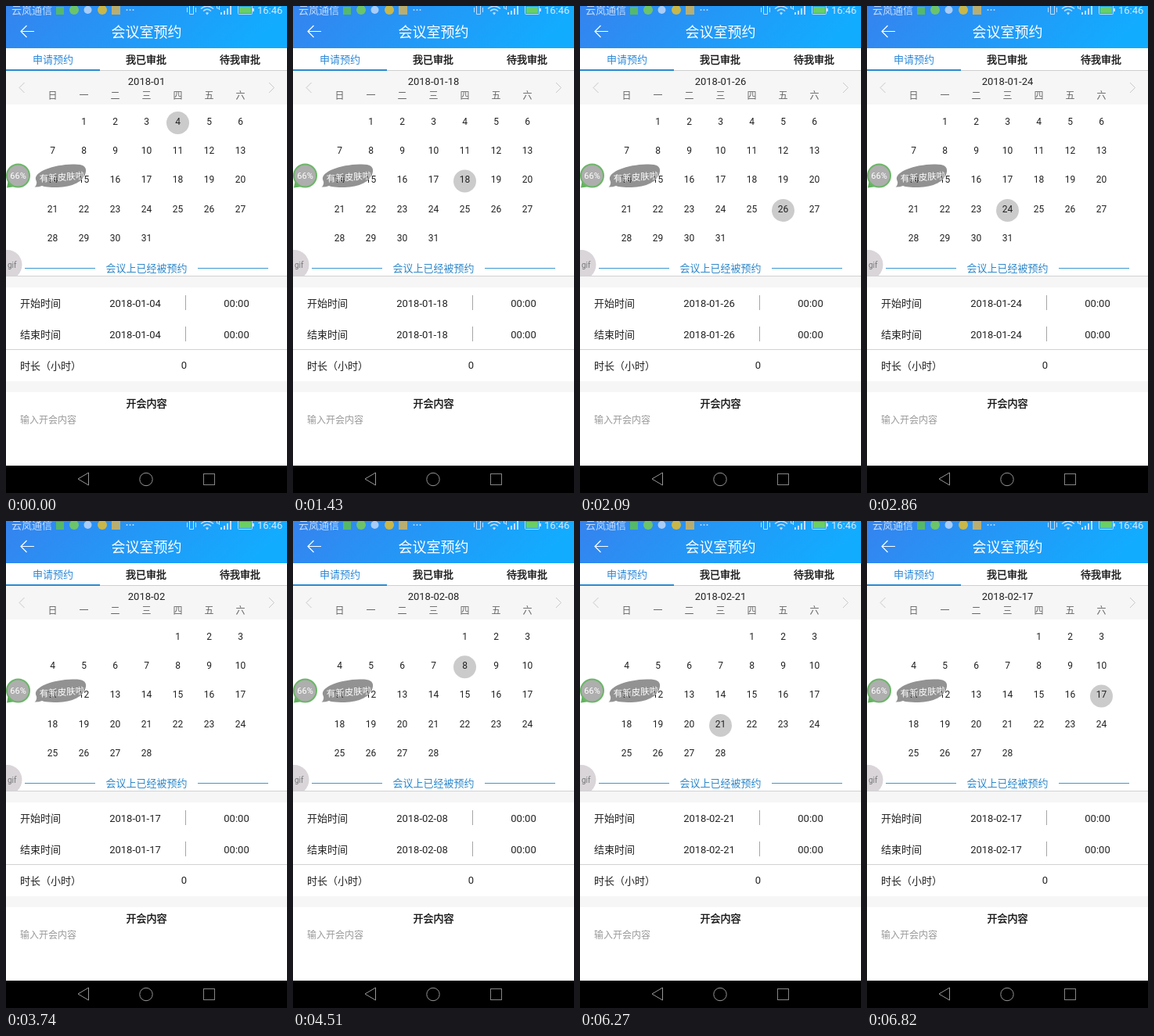
An HTML page that plays this animation: 359x623 px, repeating every 7040 ms.

```html
<!DOCTYPE html>
<html lang="zh">
<head>
<meta charset="utf-8">
<style>
html, body { margin: 0; width: 100%; height: 100%; overflow: hidden; background: #fff; }
svg { display: block; width: 359px; height: 623px; }
text { font: 13px Roboto, "Noto Sans CJK SC", "Noto Sans CJK", sans-serif; fill: #222; }
.mid { text-anchor: middle; }
.small { font-size: 12px; }
.strong { fill: #111; stroke: #111; stroke-width: .35; }
.line { fill: none; stroke-width: 1; }
</style>
</head>
<body>
<svg viewBox="0 0 359 623">
  <defs>
    <linearGradient id="sky" x2="1" y2=".15">
      <stop stop-color="#3583ee"/><stop offset="1" stop-color="#12acff"/>
    </linearGradient>
  </defs>
  <rect width="359" height="623" fill="#fff"/>
  <rect width="359" height="54" fill="url(#sky)"/>

  <!-- status bar -->
  <g>
    <text x="7" y="10" style="fill:#c4dcfb">云岚通信</text>
    <rect x="64" y="1" width="10" height="10" fill="#55b96c"/>
    <circle cx="87" cy="5" r="6" fill="#6cc46a"/>
    <circle cx="104.500" cy="5" r="5" fill="#a9cdf8"/>
    <circle cx="123" cy="5" r="6" fill="#c9b74a"/>
    <rect x="135" y="0" width="11" height="11" fill="#b9ae72"/>
    <g fill="#c4dcfb">
      <circle cx="154.500" cy="5" r="1"/><circle cx="158.500" cy="5" r="1"/><circle cx="162.500" cy="5" r="1"/>
      <path d="M255 9 L257 11.500 L259 9 A3 3 0 0 0 255 9Z"/>
      <path d="M274 11v-3h2v3zM278 11v-5h2v5zM282 11V3h2v8zM286 11V0h2v11z"/>
    </g>
    <g class="line" stroke="#c4dcfb">
      <path d="M234.500 0V10.500H239.500V0M231.500 2V8M242.500 2V8"/>
      <path d="M249 3.500Q257 -3 265 3.500M252 6.500Q257 2 262 6.500" stroke-width="1.500"/>
      <path d="M269.500 0V3H273M272.500 0V5"/>
      <rect x="296.500" y="-.5" width="18" height="11" rx="1"/>
    </g>
    <rect x="298" y="1" width="15" height="8" fill="#69cf66"/>
    <rect x="315" y="3" width="2" height="4" fill="#c4dcfb"/>
    <text x="321" y="10" style="fill:#d8e8fc">16:46</text>
  </g>

  <path d="M36 32.500H19.500M26.500 25L19 32.500L26.500 40" class="line" stroke="#fff" style="stroke-width:1.200"/>
  <text class="mid" x="179.500" y="39.500" style="font-size:18px;fill:#fff">会议室预约</text>

  <!-- tabs -->
  <text class="mid" x="60" y="73" style="fill:#2b88d8">申请预约</text>
  <text class="mid strong" x="179" y="73">我已审批</text>
  <text class="mid strong" x="299" y="73">待我审批</text>
  <rect y="83" width="359" height="43" fill="#f6f6f6"/>
  <rect y="82" width="359" height="1" fill="#cfcfcf"/>
  <rect y="81" width="120" height="2" fill="#2b8bd0"/>

  <!-- calendar -->
  <path d="M23.500 98L17 104.500L23.500 111M336 98L342.500 104.500L336 111" class="line" stroke="#c8c8c8"/>
  <text class="mid" id="title" x="179.500" y="101"></text>
  <g id="week"></g>
  <circle id="pick" r="14.500" fill="#cbcbcb"/>

  <!-- floating bubbles, the days show through -->
  <path d="M36.500 231.500Q41 228 38 222C36 212 60 203 85 202.500C98 202 103 205 102 212C100 225 84 231.500 66 232Q50 232 46 230Q41 232 36.500 231.500Z" fill="#929292"/>
  <g id="days"></g>
  <text x="43" y="225" transform="rotate(-4 43 225)" style="font-size:11.500px;fill:#fff">有新皮肤啦</text>
  <path d="M1 232.500L3 222L12 231Z" fill="#62b35e"/>
  <circle cx="15.500" cy="217" r="14.500" fill="#adaead" stroke="#6cb668" stroke-width="2"/>
  <text class="mid" x="15.500" y="221" style="font-size:11px;fill:#fff">66%</text>
  <circle cx="1.500" cy="331" r="19" fill="#d9d5d9"/>
  <text x="2" y="334.500" style="font-size:10px;fill:#777">gif</text>

  <!-- booking form -->
  <path d="M24 335.500H114M245 335.500H335" class="line" stroke="#3b98d2"/>
  <text class="mid" x="179.500" y="339.500" style="fill:#2d88ca">会议上已经被预约</text>
  <rect y="346" width="359" height="14" fill="#f6f6f6"/>
  <path d="M0 345.500H359M0 439.500H359" class="line" stroke="#d2d2d2"/>
  <path d="M229.500 370V389M229.500 410V429" class="line" stroke="#a5a5a5"/>
  <text x="18" y="385">开始时间</text>
  <text class="mid" id="start" x="165" y="385"></text>
  <text class="mid" x="294.500" y="385">00:00</text>
  <text x="18" y="425">结束时间</text>
  <text class="mid" id="end" x="165" y="425"></text>
  <text class="mid" x="294.500" y="425">00:00</text>
  <text x="18" y="464.500">时长（小时）</text>
  <text class="mid" x="227.500" y="464">0</text>
  <rect y="480" width="359" height="14" fill="#f6f6f6"/>
  <text class="mid strong" x="179.500" y="512.500">开会内容</text>
  <text class="small" x="18" y="533.500" style="fill:#999">输入开会内容</text>

  <!-- navigation bar -->
  <rect y="588" width="359" height="35" fill="#000"/>
  <g class="line" stroke="#969696">
    <path d="M105.500 597V613L92 605Z"/>
    <circle cx="179" cy="605.500" r="8.200"/>
    <rect x="252.500" y="598.500" width="14" height="14" stroke="#858585"/>
  </g>
</svg>
<script>
const LOOP = 7040;
const $ = id => document.getElementById(id);
const pad = n => String(n).padStart(2, "0");
const colX = c => 59.5 + 40 * c;
const rowY = r => 147.5 + 37.3 * r;

function addText(parent, str, x, y) {
  const el = document.createElementNS("http://www.w3.org/2000/svg", "text");
  el.setAttribute("class", "mid small");
  el.setAttribute("x", x);
  el.setAttribute("y", y);
  el.textContent = str;
  parent.append(el);
  return el;
}

[..."日一二三四五六"].forEach((d, i) => {
  addText($("week"), d, colX(i), 118.5).style.fill = "#666";
});

// first: weekday of the 1st
const months = { 1: { first: 1, length: 31 }, 2: { first: 4, length: 28 } };

function cellOf(month, day) {
  const n = months[month].first + day - 1;
  return { x: colX(n % 7), y: rowY(Math.floor(n / 7)) };
}

// bare: title shows the month alone; picked: day is highlighted
const tap = (at, month, day) => ({ at, month, day, date: [month, day], picked: true });
const steps = [
  { ...tap(0, 1, 4), bare: true },
  tap(1430, 1, 18),
  tap(1980, 1, 26),
  tap(2530, 1, 24),
  tap(3080, 1, 17),
  { at: 3740, month: 2, date: [1, 17], bare: true },
  tap(4400, 2, 8),
  tap(4840, 2, 15),
  tap(5390, 2, 14),
  tap(5940, 2, 20),
  tap(6270, 2, 21),
  tap(6820, 2, 17)
];

function drawMonth(month) {
  $("days").replaceChildren();
  for (let d = 1; d <= months[month].length; d++) {
    const { x, y } = cellOf(month, d);
    addText($("days"), d, x, y + 4.3);
  }
}

let shown, shownMonth;

function show(s) {
  if (s === shown) return;
  shown = s;
  if (s.month !== shownMonth) drawMonth(shownMonth = s.month);
  const date = "2018-" + s.date.map(pad).join("-");
  $("title").textContent = s.bare ? "2018-" + pad(s.month) : date;
  $("start").textContent = $("end").textContent = date;
  $("pick").style.display = s.picked ? "" : "none";
  if (s.picked) {
    const { x, y } = cellOf(s.month, s.day);
    $("pick").setAttribute("cx", x);
    $("pick").setAttribute("cy", y + 2);
  }
}

const began = performance.now();
function tick() {
  const t = (performance.now() - began) % LOOP;
  show(steps.filter(s => s.at <= t).pop());
  requestAnimationFrame(tick);
}
tick();
</script>
</body>
</html>
```
